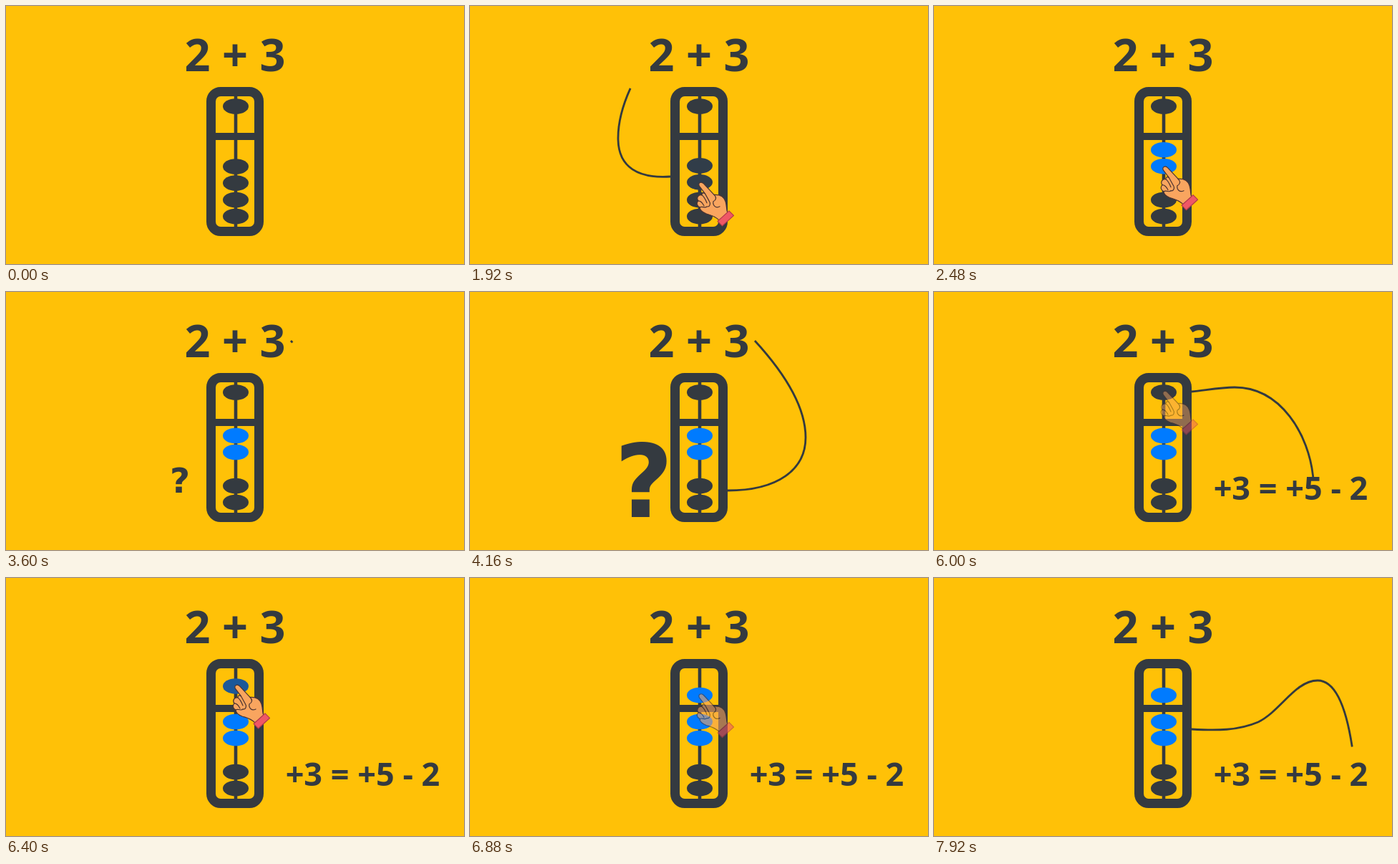
An HTML page that plays this animation: 640 px wide and 360 px high, repeating every 8 s.

```html
<!DOCTYPE html>
<html lang="en">
<head>
<meta charset="utf-8">
<title>Abacus: 2 + 3</title>
<style>
  html, body { margin: 0; width: 100%; height: 100%; overflow: hidden; background: #ffc107; }
  svg { display: block; width: 100vw; height: 100vh; }
  text { font: 700 63px "Noto Sans", "Open Sans", sans-serif; fill: #343a40; text-anchor: middle; }
  #formula text { font-size: 45px; }
  #question text { font: 700 141px "DejaVu Sans", sans-serif; }
  .line { fill: none; stroke: #343a40; stroke-width: 2.8; }
</style>
</head>
<body>
<svg viewBox="0 0 640 360">
  <rect width="640" height="360" fill="#ffc107"/>
  <text x="320" y="91">2 + 3</text>
  <g id="question"><text x="243" y="314">?</text></g>
  <g id="formula"><text x="498.5" y="289.5">+3 = +5 - 2</text></g>
  <g id="lines"></g>
  <g fill="none" stroke="#343a40">
    <path d="M321 120V314" stroke-width="4.6"/>
    <path d="M287 182H353" stroke-width="10"/>
  </g>
  <g id="beads"></g>
  <rect x="286.5" y="119.5" width="67" height="195" rx="13.5" fill="none" stroke="#343a40" stroke-width="13"/>
  <g id="hand" stroke="#4b3230" stroke-width="1.2" stroke-linejoin="round" stroke-linecap="round">
    <path fill="#f9a55f" d="M320.500 252.500C318 248 323 245.500 326.500 249L341 264.500C349 264 355 267 357 274C359 280 358 285 360 290L348 300C342 294 336 293 330 291C325 289 321 286 321 282C317 280 316 276 319 273C316 269 319 264 324 265C324 262 326 261 328.500 263Z"/>
    <path fill="none" d="M328.500 263L334 273M324 265C327 267 329 271 331 276M319 273C323 273 325 276 327 280M321 282C325 280 329 284 331 281C335 282 337 277 334 273M341 264.500C345 268 344 272 340 274M340 274C339 279 343 284 349 281"/>
    <path fill="#ef5766" stroke="#b33a4b" d="M346 301.500L362 287L368.500 293.500L352.500 308Z"/>
  </g>
</svg>
<script>
const LOOP = 8000, STEP = 80;
const DARK = [52, 58, 64], BLUE = [0, 123, 255];
const $ = id => document.getElementById(id);

const sine = p => (1 - Math.cos(Math.PI * p)) / 2;
const cubic = p => p < .5 ? 4 * p ** 3 : 1 - 4 * (1 - p) ** 3;
const quartOut = p => 1 - (1 - p) ** 4;
const quadIn = p => p * p;
const linear = p => p;
const ramp = (t, from, to, ease = linear) =>
  ease(Math.min(1, Math.max(0, (t - from) / (to - from))));

function add(parent, tag, attrs) {
  const node = document.createElementNS("http://www.w3.org/2000/svg", tag);
  for (const key in attrs) node.setAttribute(key, attrs[key]);
  return $(parent).appendChild(node);
}

// Each connector is drawn from the number to the abacus, then erased the same way.
const lines = [
  { draw: [1290, 1710], erase: [1770, 2165],
    d: "M249 72C225 105 206 150 207 187C208 225 235 241 280 238" },
  { draw: [3540, 3960], erase: [4160, 4565],
    d: "M398 68C432 105 469 155 469 203C469 248 430 277 360 277" },
  { draw: [5390, 5840], erase: [5950, 6350],
    d: "M530 261C525 200 485 133 420 133C400 133 380 137 360 139" },
  { draw: [7300, 7690], erase: [7820, 8220],
    d: "M587 256C580 195 565 143 536 143C505 143 485 185 453 201C425 213 395 213 360 211" }
].map(line => ({ ...line, node: add("lines", "path", { d: line.d, class: "line", pathLength: 1 }) }));

const LIFT = [1820, 2520], DROP = [6070, 6760];
const beads = [
  { y: 140, dy: 23.5, move: DROP },
  { y: 224, dy: -23.5, move: LIFT },
  { y: 247, dy: -23.5, move: LIFT },
  { y: 270.500 }, { y: 293.500 }
].map(bead => ({ ...bead,
  node: add("beads", "ellipse", { cx: 321, cy: bead.y, rx: 18, ry: 10.8, fill: "#343a40" }) }));

// The hand visits twice: once to lift, once to drop.
const visits = [
  { enter: [1690, 1840], move: LIFT, leave: [2520, 2810], y: 0, dy: -23.5 },
  { enter: [5930, 6080], move: DROP, leave: [6760, 7050], y: -109, dy: 23.5 }
];

function scaleAbout(id, x, y, s) {
  $(id).setAttribute("transform", `translate(${x} ${y}) scale(${s}) translate(${-x} ${-y})`);
  $(id).style.visibility = s > .002 ? "visible" : "hidden";
}

function render(t) {
  for (const { node, draw, erase } of lines) {
    const head = ramp(t, ...draw, cubic), tail = ramp(t, ...erase, cubic);
    node.style.visibility = head - tail > .001 ? "visible" : "hidden";
    node.setAttribute("stroke-dasharray", `0 ${tail} ${head - tail} 2`);
  }
  for (const { node, y, dy, move } of beads) {
    if (!move) continue;
    const p = ramp(t, ...move, sine);
    node.setAttribute("cy", y + dy * p);
    node.setAttribute("fill", `rgb(${DARK.map((c, i) => Math.round(c + (BLUE[i] - c) * p))})`);
  }
  const visit = visits[t < 4000 ? 0 : 1];
  $("hand").setAttribute("transform", `translate(0 ${visit.y + visit.dy * ramp(t, ...visit.move, sine)})`);
  $("hand").setAttribute("opacity", ramp(t, ...visit.enter) * (1 - ramp(t, ...visit.leave)));
  scaleAbout("question", 243, 262, ramp(t, 3560, 3960, quartOut) * (1 - ramp(t, 4160, 4550, quadIn)));
  scaleAbout("formula", 498.5, 274, ramp(t, 4900, 5300, quartOut));
}

const start = performance.now();
function tick() {
  const t = (performance.now() - start) % LOOP;
  render(Math.floor(t / STEP) * STEP);
  requestAnimationFrame(tick);
}
tick();
</script>
</body>
</html>
```
